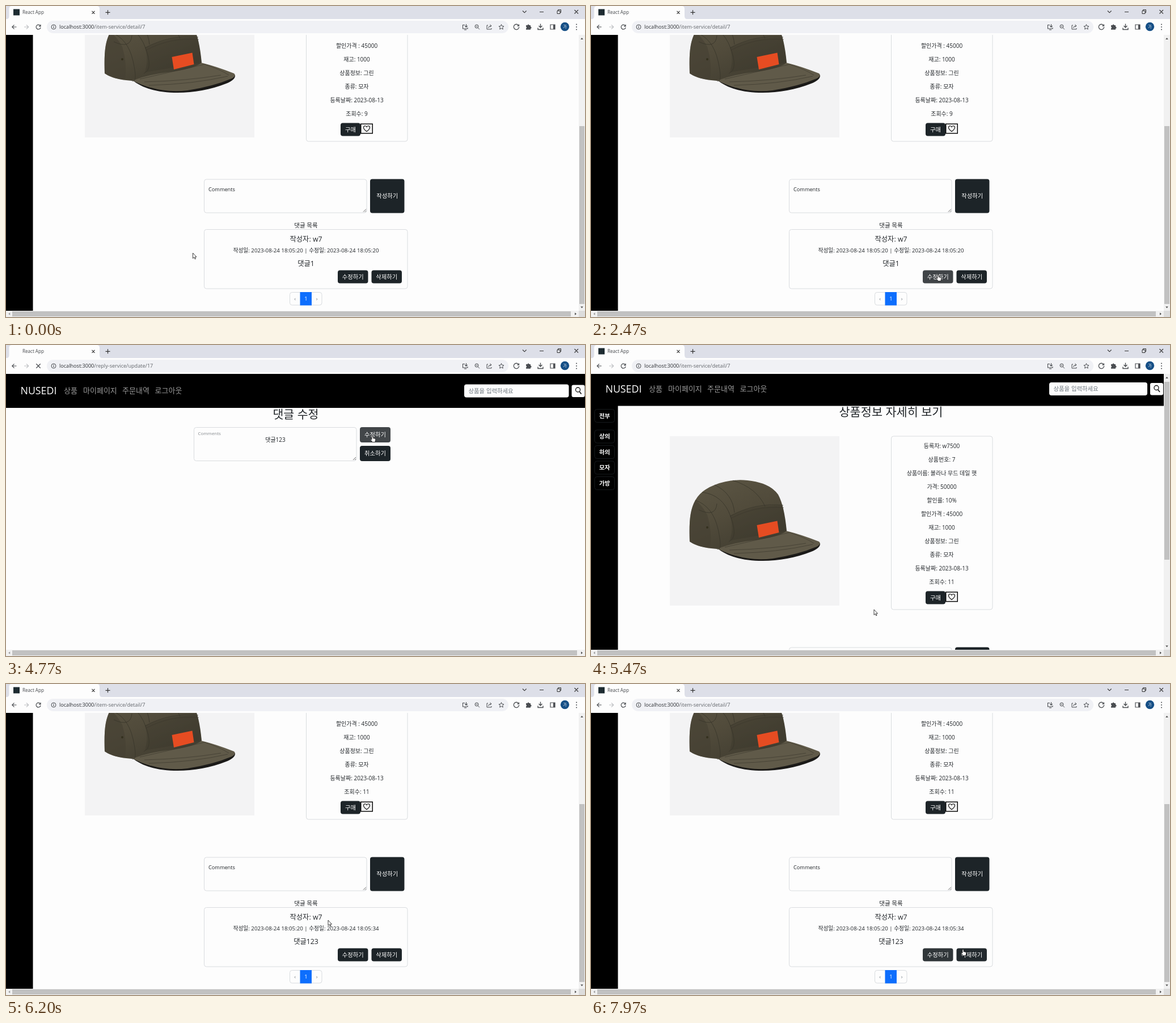
Recreate the animation shown at these times as an HTML page. Size 1021x549 px, loop 8000 ms.

```html
<!DOCTYPE html>
<html lang="ko">
<head>
<meta charset="utf-8">
<title>Comment editing</title>
<style>
html, body { margin: 0; width: 100%; height: 100%; overflow: hidden; background: #fdfdfd; }
svg { display: block; width: 1021px; height: 549px; font-family: "Open Sans", "Noto Sans CJK KR", "Noto Sans CJK", sans-serif; }
text { white-space: pre; }
</style>
</head>
<body>
<svg id="stage" viewBox="0 0 1021 549"></svg>
<script>
const LOOP = 8000, SCROLL = 228;
const INK = '#212529', DARK = '#1d2428';

// Markup helpers; text is placed by its vertical centre.
const rect = (x, y, w, h, fill, extra = '') =>
  `<rect x="${x}" y="${y}" width="${w}" height="${h}" fill="${fill}" ${extra}/>`;
const text = (x, y, size, str, fill = INK, extra = '') =>
  `<text x="${x}" y="${y + size * .36}" font-size="${size}" fill="${fill}" ${extra}>${str}</text>`;
const mid = (x, y, size, str, fill = INK, extra = '') =>
  text(x, y, size, str, fill, `text-anchor="middle" ${extra}`);
const line = (d, color = '#4a4d51', width = 1.2, extra = '') =>
  `<path d="${d}" fill="none" stroke="${color}" stroke-width="${width}" ${extra}/>`;
const shape = (d, fill, extra = '') => `<path d="${d}" fill="${fill}" ${extra}/>`;
const box = (x, y, w, h) => rect(x + .5, y + .5, w - 1, h - 1, '#fdfdfd', 'rx="4" stroke="#d9dcdf"');
const button = (x, y, w, h, label, id = '') =>
  rect(x, y, w, h, DARK, `rx="4" ${id && `id="${id}"`}`) + mid(x + w / 2, y + h / 2, 10.3, label, '#fff');
const textarea = (x, y) => box(x, y, 287.5, 60) +
  line(`M${x + 281} ${y + 58}l5-5M${x + 284} ${y + 58}l2-2`, '#444', .8);

function header(cy, bottom, searchWidth) {
  const links = [[102, '상품'], [136, '마이페이지'], [205, '주문내역'], [262.5, '로그아웃']];
  const bx = 808 + searchWidth + 5;
  return rect(0, 51, 1021, bottom - 51, '#000') +
    text(25.5, cy, 17.8, 'NUSEDI', '#fff') +
    links.map(([x, label]) => text(x, cy - .5, 13, label, '#9b9b9b', 'font-weight="500"')).join('') +
    rect(808, cy - 11.5, searchWidth, 23, '#fdfdfd', 'rx="4"') +
    text(815.5, cy, 10.4, '상품을 입력하세요', '#6c757d') +
    rect(bx, cy - 10.5, 23, 21.5, '#fdfdfd', 'rx="3"') +
    `<circle cx="${bx + 11}" cy="${cy - 2}" r="4" fill="none" stroke="#111" stroke-width="1.3"/>` +
    line(`M${bx + 13.7} ${cy + 1.2}l3.3 4.3`, '#111', 1.6);
}

function hat() {
  const seam = (d, w = .8) => line(d, '#38352a', w);
  return rect(139, 161, 299, 299, '#f3f3f4') +
    shape('M222 358C255 387 330 388 388 365Q405 358 404 350L395 352 230 352Z', '#1b1a18') +
    shape('M215 354Q280 336 344 328Q372 335 402 347Q407 351 398 356Q365 370 320 377Q268 383 222 359Z', '#605a49') +
    shape('M174 347C173 313 174 292 184 274Q194 256 218 247Q246 236 276 239Q315 243 330 264Q341 284 345 328Q332 339 285 345Q250 349 222 360Q190 358 174 347Z', 'url(#cloth)') +
    shape('M174 347C173 313 174 292 184 274Q196 283 205 300Q214 330 210 358Q188 357 174 347Z', '#454033', 'opacity=".6"') +
    shape('M245 302Q290 280 338 284L345 328Q300 336 245 345Q252 322 245 302Z', '#37342a', 'opacity=".35"') +
    seam('M184 274Q215 285 224 325T222 360') + seam('M196 260Q232 264 246 302T243 347') +
    seam('M245 302Q290 278 339 283') + seam('M247 306Q290 283 340 287', .5) +
    seam('M218 247Q250 262 253 296') + seam('M250 239Q292 252 307 285') + seam('M190 291Q220 305 222 280') +
    seam('M236 357Q310 340 350 331Q378 340 393 350', .6) +
    seam('M244 362Q320 360 379 350', .6) + seam('M252 368Q330 366 391 352', .6) +
    '<circle cx="205" cy="322" r="2" fill="#34311f"/>' +
    shape('M292.5 318L328.5 310.5 331.5 331 296 340Z', '#e64c22');
}

function detailPage() {
  const rows = ['등록자: w7500', '상품번호: 7', '상품이름: 볼라나 무드 데일 햇', '가격: 50000', '할인률: 10%',
    '할인가격 : 45000', '재고: 1000', '상품정보: 그린', '종류: 모자', '등록날짜: 2023-08-13', '조회수: 9'];
  const menu = [[125, '전부'], [161.5, '상의'], [189, '하의'], [216.5, '모자'], [244, '가방']];
  return rect(0, 51, 47.5, 800, '#000') + header(77.5, 107.5, 173) +
    menu.map(([y, label]) => rect(6.5, y - 11.5, 35, 23, '#000', 'rx="4" stroke="#171a1d"') +
      mid(24, y, 10.4, label, '#fff', 'font-weight="700"')).join('') +
    mid(529, 119, 20.8, '상품정보 자세히 보기') + hat() + box(529, 160.5, 179.5, 307) +
    rows.map((row, i) => mid(618.5, 178.3 + 24 * i, 10, row, INK, i == 10 ? 'id="views"' : '')).join('') +
    button(590, 434.5, 35, 23, '구매') + rect(625.7, 436.2, 20.6, 16.6, '#f2f2f2', 'stroke="#000" stroke-width="1.4"') +
    line('M636 449.5C631 446 630.5 444 630.5 442.5C630.5 439.4 634.5 438.8 636 441.5C637.5 438.8 641.5 439.4 641.5 442.5C641.5 444 641 446 636 449.5Z', '#111', 1.1) +
    textarea(349, 533.5) + text(357, 551.5, 9.2, 'Comments') + button(642, 533.5, 60.5, 60, '작성하기') +
    mid(529, 615, 10.5, '댓글 목록') + box(349, 622, 359.5, 105.5) +
    mid(529, 640, 12.3, '작성자: w7') + mid(529, 659.5, 9.7, '', INK, 'id="dates"') +
    mid(529, 683, 12.3, '', INK, 'id="reply"') +
    button(585, 694.5, 53.5, 23, '수정하기', 'edit') + button(644.5, 694.5, 53.5, 23, '삭제하기', 'remove') +
    box(500, 733, 57.5, 23.5) + rect(518.5, 733, 20.5, 23.5, '#0d6efd') +
    mid(509.5, 744.5, 9, '‹', '#6c757d') + mid(528.8, 744.8, 9.3, '1', '#fff') + mid(548, 744.5, 9, '›', '#6c757d');
}

function updatePage() {
  return header(81, 111, 184.5) + mid(511, 123, 20.6, '댓글 수정') +
    textarea(331, 145) + text(338.5, 156, 7.9, 'Comments', '#85898d') +
    mid(475, 167.5, 10, '', INK, 'id="draft"') +
    button(624, 145, 54, 27, '수정하기', 'save') + button(624, 178, 54, 27, '취소하기');
}

function browser() {
  const dots = [32.5, 37, 41.5].map(y => `<circle cx="1006" cy="${y}" r="1"/>`).join('');
  return rect(0, 0, 1021, 23, '#dddfe8') + rect(0, 23, 1021, 28, '#fdfdfd') +
    shape('M1 23Q5.5 23 5.5 18V5Q5.5 0 10.5 0H160Q165 0 165 5V18Q165 23 169.5 23Z', '#fdfdfd') +
    rect(13, 5.5, 11, 11, '#1d2b31', 'id="favicon"') + text(29, 11, 8.1, 'React App', '#44474b') +
    line('M151.5 8.8l5 5m0-5l-5 5M175.5 11.3h8m-4-4v8', '#333') +
    line('M911 8.5l3.3 3.3 3.3-3.3M941 10.5h7M1002.5 7l6.5 6.5m0-6.5l-6.5 6.5', '#333', 1.1) +
    line('M972 8.5h5v5h-5zM973.5 8.5v-2h5v5h-1.5', '#333', 1) +
    rect(72, 26, 814, 22, '#f0f1f5', 'rx="11"') +
    line('M18.5 37H11m3.5-3.7L10.8 37l3.7 3.7') + line('M32 37h7.5m-3.5-3.7l3.7 3.7-3.7 3.7', '#bdbfc2') +
    line('M60.6 35.2A4 4 0 1 0 61 38M61 32.8v3h-3', '#4a4d51', 1.2, 'id="reload"') +
    line('M53.3 33.3l7.4 7.4m0-7.4l-7.4 7.4', '#4a4d51', 1.3, 'id="stop"') +
    '<circle cx="84" cy="37" r="4" fill="none" stroke="#4a4d51"/>' + line('M84 36.3v2.8M84 34.5v1') +
    text(94, 37, 9.1, 'localhost:3000<tspan id="path" fill="#62666b"></tspan>', '#2b2e32') +
    line('M809 33.5h-3.5v6.5h8.5v-2M808 42h4M811.5 32v5m-2.3-2l2.3 2.3 2.3-2.3', '#4a4d51', 1.1) +
    '<circle cx="830" cy="36" r="3" fill="none" stroke="#4a4d51"/>' + line('M832 38.3l3 3M828.5 36h3', '#4a4d51', 1) +
    line('M850 34h-2v7h8v-2M850.5 39q.5-4 5-4m-2-2.3l2.5 2.3-2.5 2.3', '#4a4d51', 1) +
    line('M873.5 32.5l1.3 3 3.2.3-2.4 2.1.7 3.2-2.8-1.7-2.8 1.7.7-3.2-2.4-2.1 3.2-.3z', '#4a4d51', 1) +
    line('M903.5 33.8A4.7 4.7 0 1 0 904.7 37M904.5 32.5v2.5h-3', '#4a4d51', 1.3) +
    shape('M917 34h2.5a1.6 1.6 0 0 1 3.2 0h2.3v2.6a1.6 1.6 0 0 1 0 3.2v2h-8v-2.3a1.6 1.6 0 0 0 0-3z', '#4a4d51') +
    line('M942.5 31.5v6.5m-3-3l3 3 3-3M938 38.5v3h9v-3', '#4a4d51', 1.4) +
    line('M960 33h8v8h-8z') + rect(965, 33, 3, 8, '#4a4d51') +
    '<circle cx="985.5" cy="36.5" r="7.7" fill="#164f86"/>' + mid(985.5, 36.5, 6.5, '가', '#fff') +
    `<g fill="#4a4d51">${dots}</g>`;
}

function scrollbars() {
  const tri = (d, fill = '#505050') => shape(d, fill);
  return rect(0, 538, 1021, 11, '#f1f1f1') + rect(11, 539, 996, 9, '#c1c1c1', 'id="hthumb"') +
    tri('M4.2 543.5l3-2.3v4.6z', '#999') +
    '<g id="rightArrow">' + tri('M1003 541.2v4.6l3-2.3z') + '</g>' +
    '<g id="vbar">' + rect(1010, 51, 11, 487, '#f1f1f1') + rect(1010, 538, 11, 11, '#dcdcdc') +
    rect(1011, 65, 9, 314, '#c1c1c1', 'id="vthumb"') +
    tri('M1013.2 59l2.3-3 2.3 3z') + tri('M1013.2 530.5l2.3 3 2.3-3z') + '</g>';
}

const outline = 'stroke="#111" stroke-width=".8" stroke-linejoin="round"';
document.getElementById('stage').innerHTML =
  '<defs><linearGradient id="cloth" x2=".6" y2="1"><stop stop-color="#5d5745"/><stop offset=".55" stop-color="#514b3b"/><stop offset="1" stop-color="#423e31"/></linearGradient></defs>' +
  rect(0, 0, 1021, 549, '#fdfdfd') +
  `<g id="detail">${detailPage()}</g><g id="update">${updatePage()}</g>` + scrollbars() + browser() +
  '<g id="cursor">' +
  shape('M0 0V9.5L2.2 7.5 3.7 10.8 5.1 10.2 3.7 7H6.5Z', '#fff', `id="arrow" ${outline}`) +
  shape('M-1.1 1Q0-.5 1.1 1V4.3L4.9 5.2Q6 5.8 5.7 7.5L4.8 11.5H.2L-3.2 7.2Q-2.9 5.6-1.1 7Z', '#fff', `id="hand" ${outline}`) +
  line('M-2-5q2 0 2 1q0-1 2-1M0-4V4M-2 5q2 0 2-1q0 1 2 1', '#222', .9, 'id="beam"') + '</g>';

const $ = Object.fromEntries([...document.querySelectorAll('[id]')].map(el => [el.id, el]));
const show = (el, on) => el.style.display = on ? '' : 'none';
const write = (el, str) => { if (el.textContent !== str) el.textContent = str; };
const ramp = (t, from, to) => Math.min(1, Math.max(0, (t - from) / (to - from)));
const ease = k => k * k * (3 - 2 * k);

// Pointer stops: time, x, y
const STOPS = [[0, 329.5, 436], [700, 329.5, 436], [1560, 374, 386], [1750, 384, 388], [2420, 612, 474], [2920, 612, 474],
  [3130, 588, 430], [3300, 548, 262], [3480, 492, 169], [4150, 492, 169], [4480, 646, 160], [4900, 646, 160],
  [5470, 499, 467], [5800, 499, 467], [6200, 568, 417], [6500, 574, 420], [7250, 614, 474], [7820, 618, 474], [7970, 656, 468], [8000, 658, 469]];
const OPEN = 2800, SUBMIT = 4620, RETURN = 4880;

function pointer(t) {
  const i = STOPS.findIndex((stop, n) => n && t <= stop[0]);
  const [t0, x0, y0] = STOPS[i - 1], [t1, x1, y1] = STOPS[i];
  const k = ease(ramp(t, t0, t1));
  return [x0 + (x1 - x0) * k, y0 + (y1 - y0) * k];
}

function hover(el, t, ...spans) {
  const k = spans.reduce((sum, [a, b]) => sum + ramp(t, a, a + 150) - ramp(t, b, b + 150), 0);
  const mix = (a, b) => Math.round(a + (b - a) * k);
  el.setAttribute('fill', `rgb(${mix(29, 66)},${mix(36, 70)},${mix(40, 73)})`);
}

function draw(now) {
  const t = now % LOOP;
  const editing = t >= OPEN && t < RETURN, saved = t >= RETURN, loading = t >= SUBMIT && t < RETURN;
  const scroll = saved ? SCROLL * ease(ramp(t, 5540, 5760)) : SCROLL;

  show($.detail, !editing);
  show($.update, editing);
  show($.vbar, !editing);
  show($.favicon, !loading);
  show($.reload, !loading);
  show($.stop, loading);
  $.detail.setAttribute('transform', `translate(0 ${-scroll})`);
  $.vthumb.setAttribute('y', 65 + 147 * scroll / SCROLL);
  $.hthumb.setAttribute('width', editing ? 996 : 985);
  $.rightArrow.setAttribute('transform', `translate(${editing ? 11 : 0} 0)`);

  write($.path, editing ? '/reply-service/update/17' : '/item-service/detail/7');
  write($.views, '조회수: ' + (saved ? 11 : 9));
  write($.dates, `작성일: 2023-08-24 18:05:20 | 수정일: 2023-08-24 18:05:${saved ? 34 : 20}`);
  write($.reply, saved ? '댓글123' : '댓글1');
  write($.draft, '댓글1' + (t >= 3800 ? '2' : '') + (t >= 4000 ? '3' : ''));

  hover($.edit, t, [2330, OPEN], [7130, 7900]);
  hover($.remove, t, [7950, LOOP]);
  hover($.save, t, [4400, 5000]);

  const [x, y] = pointer(t);
  const inside = (l, top, r, b) => x > l && x < r && y > top && y < b;
  const onText = editing && inside(331, 145, 618, 205);
  const onButton = editing ? inside(624, 145, 678, 172)
    : scroll > 200 && (inside(585, 467, 638, 490) || inside(644, 467, 698, 490));
  show($.arrow, !onText && !onButton);
  show($.hand, onButton);
  show($.beam, onText);
  $.cursor.setAttribute('transform', `translate(${x} ${y})`);
}

function tick() {
  draw(performance.now());
  requestAnimationFrame(tick);
}
tick();
</script>
</body>
</html>
```
